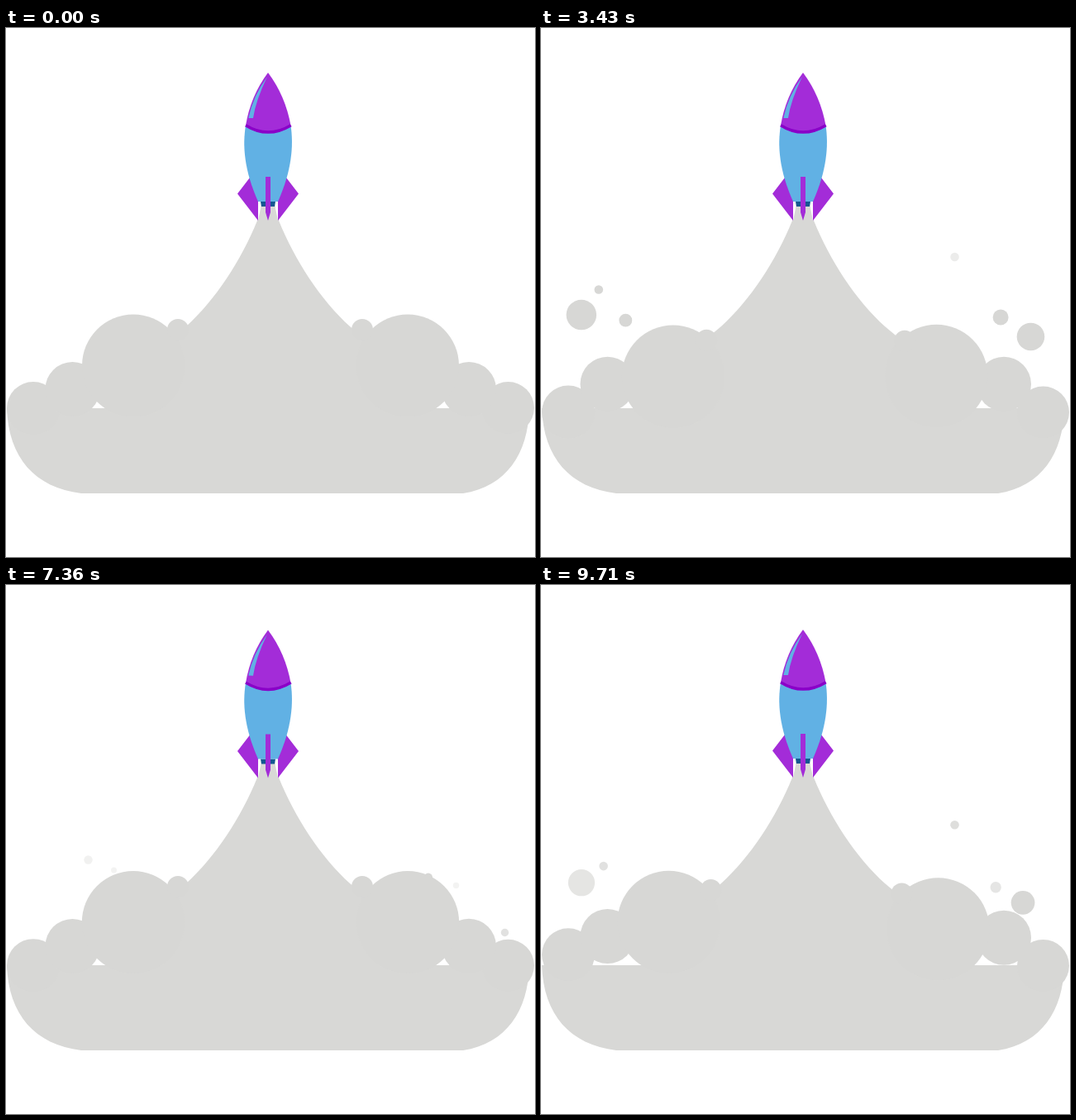
Animation, 640 px wide and 640 px high, one loop 9.78 s. Source, as an HTML page with a canvas:

```html
<!DOCTYPE html>
<html lang="en">
<head>
<meta charset="utf-8">
<title>Rocket launch</title>
<style>
  html, body { margin: 0; height: 100%; overflow: hidden; background: #fff; }
  canvas { display: block; width: 640px; height: 640px; }
</style>
</head>
<body>
<canvas id="stage" width="640" height="640"></canvas>
<script>
const ctx = document.getElementById('stage').getContext('2d');
const DURATION = 9780, FPS = 14, CYCLE = 7.23;
const SMOKE = '#d8d8d6', PUFF = '#d7d7d5', PURPLE = '#a32cd8', BAND = '#8a00c8', BLUE = '#61b1e4', NOZZLE = '#135791';

const clamp = v => Math.min(1, Math.max(0, v));
const ease = p => (1 - Math.cos(Math.PI * clamp(p))) / 2;
const linear = p => p;

// Keys are [time, ...values]; the curve decides what happens outside the range.
function sample(keys, t, curve) {
  let i = 0;
  while (i < keys.length - 2 && t >= keys[i + 1][0]) i++;
  const [t0, ...a] = keys[i], [t1, ...b] = keys[i + 1];
  const p = curve((t - t0) / (t1 - t0));
  return a.map((v, j) => v + (b[j] - v) * p);
}

function fill(path, color) {
  ctx.fillStyle = color;
  ctx.fill(new Path2D(path));
}

function disc(x, y, r, alpha = 1) {
  ctx.globalAlpha = alpha;
  ctx.fillStyle = PUFF;
  ctx.beginPath();
  ctx.arc(x, y, Math.max(0, r), 0, 2 * Math.PI);
  ctx.fill();
  ctx.globalAlpha = 1;
}

// Puffs that only bob up and down
const bob = (x, r, ...keys) => t => disc(x, sample(keys, t, ease)[0], r);
// Puffs that roll from home to a far point and back
function roll(r, home, far, leave, turn, top = home) {
  const keys = [[leave, ...top], [turn, ...far], [6, ...home]];
  if (top !== home) keys.unshift([0, ...home]);
  return t => disc(...sample(keys, t, ease), r);
}

const puffs = [
  bob(33, 32, [0, 460], [1.2, 466], [2.4, 447], [3.6, 465.5], [5, 465.5], [6, 460]),
  bob(80.5, 33, [0, 437], [2.4, 425], [3.6, 431], [5, 431], [6, 437]),
  roll(62, [154, 408.5], [160, 422], 1.2, 3.6, [147.8, 390]),
  roll(13, [208, 365], [200, 378], 1.8, 3.6),
  bob(607.5, 31.5, [0, 459.5], [.6, 467], [1.8, 445], [2.8, 465], [5, 465], [6, 459.5]),
  bob(560, 33, [0, 437], [1.8, 424.7], [3.6, 431], [5, 431], [6, 437]),
  roll(62, [486, 408.5], [478, 421.5], 1.2, 3, [491, 393.5]),
  roll(13, [431, 365], [440, 379], 1, 3.6)
];

// Loose bubbles drift along [time, x, y, radius]; echo is their opacity the second time round.
const bubble = (start, fadeFrom, fadeTo, echo, ...keys) => (t, again) => {
  if (t < start || t > fadeTo) return;
  const alpha = clamp((fadeTo - t) / (fadeTo - fadeFrom));
  disc(...sample(keys, t, linear), alpha * (again ? echo : 1));
};

const bubbles = [
  bubble(.3, 3.8, 5.4, .65, [1.357, 61, 381.5, 12.6], [2.429, 49, 361, 16], [4.286, 48.7, 335, 20.2]),
  bubble(1.45, 4.3, 5.7, .75, [1.55, 96, 368, 6], [2.429, 76, 341.5, 5.3], [4.286, 64.5, 295, 5.3]),
  bubble(2.9, 4.3, 5.8, 1, [2.9, 105, 375, 6], [4.286, 98, 319, 11]),
  bubble(.1, 2, 4.75, 1, [.1, 511, 355, 5.3], [1.357, 503.7, 303.7, 5.3], [2.429, 500.5, 291, 5.3], [4.286, 500.5, 265, 5.2]),
  bubble(1.75, 4.3, 5.7, .65, [2.429, 549.8, 366.7, 6.5], [4.286, 561.5, 335.7, 12]),
  bubble(1.4, 3.8, 5.4, 1, [1.4, 570, 415, 8], [2.429, 582.5, 385, 14.2], [4.286, 601, 363.5, 19])
];

// Faint bubbles that rise and vanish around the turn of the cycle
const wisp = (x, y, r, alpha) => t => {
  const age = t - 7.357;
  if (age > -.86 && age < .55) disc(x, y - 14.5 * age, r + age, alpha * clamp(1 - age / .55));
};
const wisps = [wisp(99.5, 332.5, 5.2, .35), wisp(130.5, 345, 3.5, .3), wisp(544.5, 363.5, 3.7, .3), wisp(603.5, 420.5, 4.7, .75)];

const cloudBase = `M1 460C3 520 35 556 91 563H553C605 555 632 515 633 460H490
  L434 376L416 361C380 328 350 282 330 233L325 212H309L304 233
  C284 282 254 328 218 361L200 376L144 460Z`;

function drawRocket(drop) {
  const k = drop / 15;
  ctx.save();
  ctx.translate(0, drop);
  fill('M305 209H309L308 218L305 233ZM329 209H325L326 218L329 233Z', '#fff');
  fill('M295 181L280 200.5L305 233V205ZM339 181L354 200.5L329 233V205Z', PURPLE);
  fill('M308 210H326L325 216H309Z', NOZZLE);
  fill('M290 118C286 142 288 172 305 210H329C346 172 348 142 344.5 118Z', BLUE);
  fill('M317 54Q296 82 290 118Q317 134 344.5 118Q338 82 317 54Z', PURPLE);
  ctx.strokeStyle = BAND;
  ctx.lineWidth = 3.5;
  ctx.stroke(new Path2D('M290 117.7Q317 134.5 344.7 117.7'));

  // The glint slides down the nose as the rocket sinks.
  const x = 316 - 6 * k, y = 59 + 17 * k, bottom = 109 + 7.5 * k;
  fill(`M${x} ${y}Q${299 - 2 * k} ${82 + 12 * k} ${293.3 - k} ${bottom - k}
    L${299 - k / 2} ${bottom}Q${302 - 2 * k} ${88 + 11 * k} ${x} ${y}Z`, BLUE);

  fill('M314 180H320V223L317 233L314 223Z', PURPLE);
  ctx.restore();
}

// Two dips per cycle, each 1.2 s down and 1.2 s up
function rocketDrop(t) {
  const dip = start => ease(1 - Math.abs(t - start - 1.2) / 1.2);
  return 15.2 * (dip(0) + dip(3.53));
}

function draw(t) {
  const phase = t % CYCLE;
  ctx.fillStyle = '#fff';
  ctx.fillRect(0, 0, 640, 640);
  bubbles.forEach(show => show(phase, t > CYCLE));
  wisps.forEach(show => show(t));
  fill(cloudBase, SMOKE);
  puffs.forEach(show => show(phase));
  drawRocket(rocketDrop(phase));
}

const start = performance.now();
function tick() {
  const ms = (performance.now() - start) % DURATION;
  draw(Math.floor((ms + 6) * FPS / 1000) / FPS);
  requestAnimationFrame(tick);
}
tick();
</script>
</body>
</html>
```
